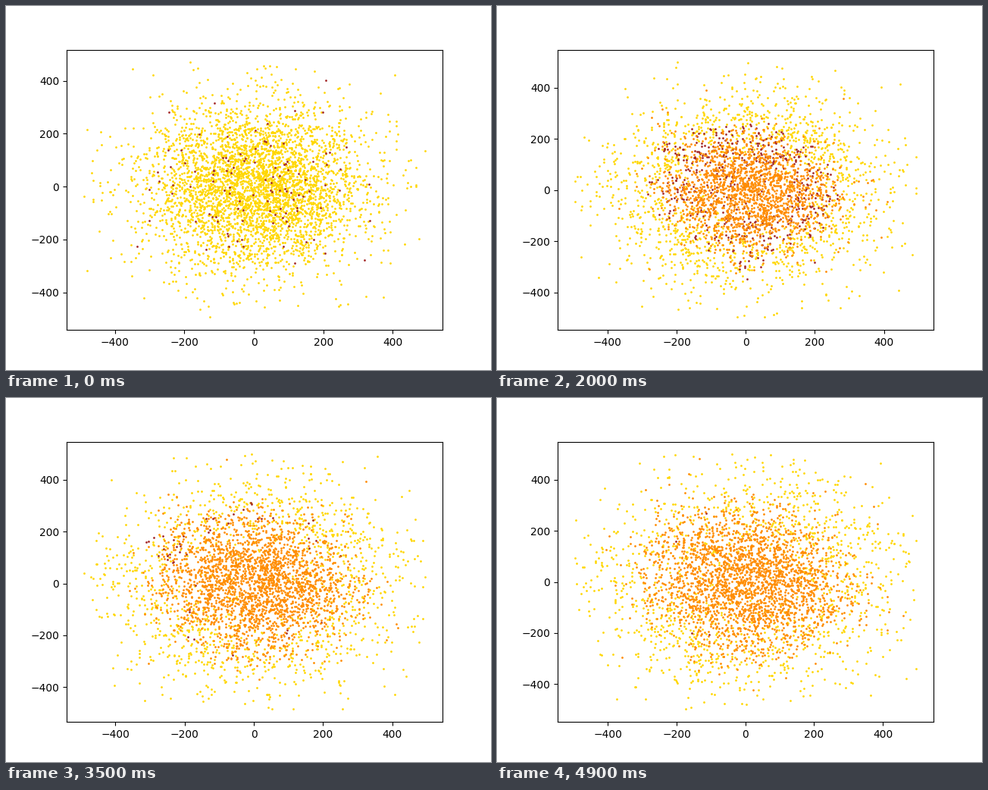
Write a matplotlib script that moves like this. It is 640x480 px and loops after 5000 ms.

```python
import matplotlib.pyplot as plt
import numpy as np
from matplotlib.animation import FuncAnimation

FRAMES, INTERVAL = 50, 100
PEOPLE, FIRST_CASES = 4000, 110
BOUND, SPREAD, STEP = 500, 157, 20
REACH, CONTAGION, MORTALITY = 8, 0.15, 0.12
HEALTHY, SICK, RECOVERED, DEAD = range(4)
COLORS = ("gold", "brown", "darkorange")
MARGIN = 0.05


def inside(points):
    return (np.abs(points) < BOUND).all(axis=1)


def neighbour_counts(targets, sources):
    dx = targets[:, None, 0] - sources[None, :, 0]
    dy = targets[:, None, 1] - sources[None, :, 1]
    return (dx * dx + dy * dy < REACH ** 2).sum(axis=1)


def simulate(rng):
    """Return (positions, states) for every frame."""
    places = rng.normal(0, SPREAD, (PEOPLE + 200, 2))
    places = places[inside(places)][:PEOPLE]
    count = len(places)
    states = np.full(count, HEALTHY)
    states[:FIRST_CASES] = SICK
    age = np.zeros(count, int)
    duration = rng.integers(6, 10, count)
    history = []
    for _ in range(FRAMES):
        history.append((places.copy(), states.copy()))

        moved = places + rng.uniform(-STEP, STEP, places.shape)
        allowed = inside(moved)
        places[allowed] = moved[allowed]

        healthy = np.flatnonzero(states == HEALTHY)
        sick = np.flatnonzero(states == SICK)
        contacts = neighbour_counts(places[healthy], places[sick])
        caught = rng.random(len(healthy)) > (1 - CONTAGION) ** contacts

        age[sick] += 1
        done = sick[age[sick] >= duration[sick]]
        dies = rng.random(len(done)) < MORTALITY
        states[done] = np.where(dies, DEAD, RECOVERED)
        states[healthy[caught]] = SICK
    return history


def padded_range(values):
    low, high = values.min(), values.max()
    pad = MARGIN * (high - low)
    return low - pad, high + pad


history = simulate(np.random.default_rng(11))

fig, ax = plt.subplots(figsize=(6.4, 4.8), dpi=100)
layers = [ax.scatter([], [], s=1, color=color) for color in COLORS]


def draw(frame):
    places, states = history[frame]
    for state, layer in enumerate(layers):
        layer.set_offsets(places[states == state])
    x, y = places[states != DEAD].T
    ax.set_xlim(padded_range(x))
    ax.set_ylim(padded_range(y))
    return layers


animation = FuncAnimation(fig, draw, frames=FRAMES, interval=INTERVAL,
                          repeat=True, repeat_delay=0)
plt.show()
```
